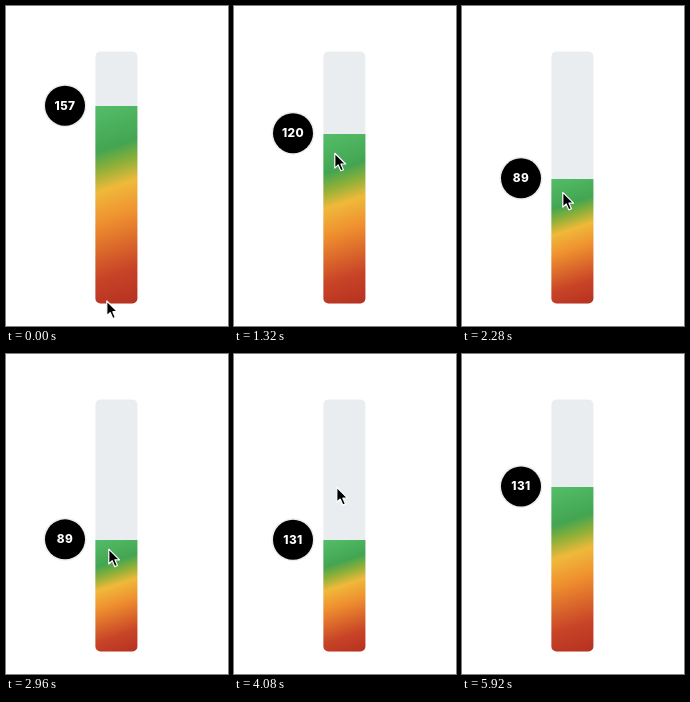
An HTML page that plays this animation: 222x320 px, repeating every 6680 ms.

```html
<!DOCTYPE html>
<html lang="en">
<head>
<meta charset="utf-8">
<title>Level slider</title>
<style>
  html, body { margin: 0; width: 100%; height: 100%; overflow: hidden; background: #fff; }
  #track {
    position: absolute; left: 89px; top: 45px; width: 43px; height: 253px;
    clip-path: inset(.5px .6px .5px .4px round 5px); background: #e9edf0;
  }
  #fill {
    position: absolute; bottom: 0; width: 100%;
    background: linear-gradient(-18deg, #b63020, #c84427 18%, #ef902f 44%,
      #efb93a 59%, #8fb038 69%, #43a551 78%, #54bd69);
  }
  #badge {
    position: absolute; left: 39px; top: -20px; width: 40px; height: 40px;
    border-radius: 50%; box-shadow: 0 0 0 1.5px #ececec;
    background: #000; color: #fff; text-align: center;
    font: 800 11.8px/40px Inter, sans-serif; letter-spacing: .4px;
  }
  #cursor { position: absolute; left: 0; top: 0; overflow: visible; }
</style>
</head>
<body>
<div id="track"><div id="fill"></div></div>
<div id="badge"></div>
<svg id="cursor" width="14" height="21">
  <path d="M.8 1V15.8L4.2 12.6 6.8 18.5 9.4 17.4 6.9 11.7H11.6Z" stroke="#fff" stroke-width="1.2" stroke-linejoin="round"/>
</svg>
<script>
const LOOP = 6680, BOTTOM = 297.5, PX_PER_UNIT = 1.26, START = 157;
const COUNT_MS = 90, LEVEL_DELAY = 45, LEVEL_MS = 500, REST_MS = 20;

// The pointer travels to the wanted level, rests briefly and clicks
const clicks = [
  { time: 996, value: 120, x: 100, travel: 300 },
  { time: 1930, value: 89, x: 100, travel: 120 },
  { time: 3000, value: 82, x: 102, travel: 500 },
  { time: 3920, value: 131, x: 102, travel: 450 }
];

const [fill, badge, cursor] = ['fill', 'badge', 'cursor'].map(id => document.getElementById(id));
const clamp = p => Math.min(1, Math.max(0, p));
const linear = p => p;
const easeInOut = p => p * p * (3 - 2 * p);
const mix = (a, b, p) => a + (b - a) * p;
const levelY = value => BOTTOM - value * PX_PER_UNIT;

const moves = [
  { end: 560, travel: 560, x: 100, y: 94 },
  ...clicks.map(({ time, value, x, travel }) => ({ end: time - REST_MS, travel, x, y: levelY(value) })),
  { end: 5580, travel: 340, x: 116, y: 6 }
];
const exitTime = moves.at(-1).end;

function valueAt(t, delay, duration, ease) {
  return clicks.reduce((value, click) =>
    mix(value, click.value, ease(clamp((t - click.time - delay) / duration))), START);
}

function pointerAt(t) {
  return moves.reduce((from, move) => {
    const p = easeInOut(clamp((t - move.end) / move.travel + 1));
    return { x: mix(from.x, move.x, p), y: mix(from.y, move.y, p) };
  }, { x: 100, y: 294 });
}

function draw(now) {
  const t = now % LOOP;
  const level = valueAt(t, LEVEL_DELAY, LEVEL_MS, easeInOut);
  fill.style.height = level * PX_PER_UNIT + 'px';
  badge.style.transform = `translateY(${levelY(level)}px)`;
  badge.textContent = Math.round(valueAt(t, 0, COUNT_MS, linear));

  const { x, y } = pointerAt(t);
  cursor.style.transform = `translate(${x}px, ${y}px)`;
  cursor.style.visibility = t < exitTime ? 'visible' : 'hidden';
  requestAnimationFrame(draw);
}
draw(performance.now());
</script>
</body>
</html>
```
